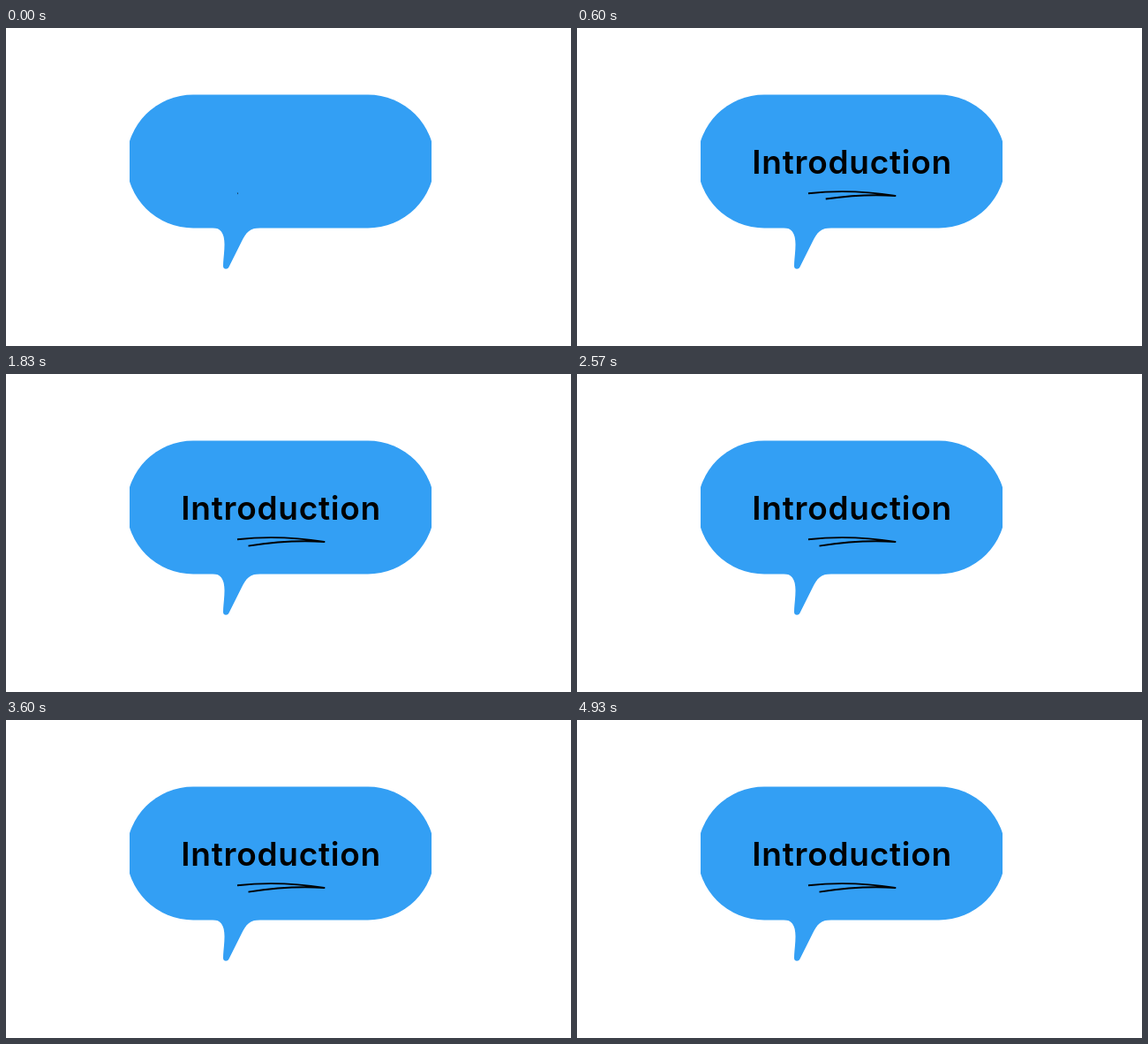
An HTML page for the animation above (5 s loop, 640x360 px).

```html
<!DOCTYPE html>
<html lang="en">
<head>
<meta charset="utf-8">
<title>Introduction</title>
<style>
  html, body { margin: 0; width: 100%; height: 100%; overflow: hidden; background: #fff; }
  svg { display: block; width: 100vw; height: 100vh; }
  text { font: 600 37px Inter, "Open Sans", sans-serif; letter-spacing: .75px; text-anchor: middle; }
</style>
</head>
<body>
<svg viewBox="0 0 640 360">
  <clipPath id="sides"><rect x="140" y="70" width="342" height="210"/></clipPath>
  <clipPath id="shown"><rect id="reveal" x="173" y="120" width="0" height="64"/></clipPath>
  <g fill="#339ff4" clip-path="url(#sides)">
    <rect x="136.5" y="75.5" width="349" height="151" rx="75.5"/>
    <path d="M234 226C243 226.500 247.500 232 247.500 245C247.500 254 246 262 246 269.500C246 273.500 251 273.800 252.500 270.500L267 241.500C272 231.500 276 226.500 288 226Z"/>
  </g>
  <text x="311.6" y="165" clip-path="url(#shown)">Introduction</text>
  <rect id="block" y="129" width="0" height="45"/>
  <path id="scribble" d="M262 187.200C295 183.600 325 184.300 360.500 190C332 188 303 190.200 274.500 194.600"
        pathLength="1" fill="none" stroke="#000" stroke-width="1.9" stroke-linejoin="round"/>
</svg>
<script>
  const LOOP = 5000, LEFT = 173, WIDTH = 276;
  const GROW_END = 310, REVEAL_END = 600;
  const SCRIBBLE_LOOP = 2690, SCRIBBLE_DRAW = 750;

  const [reveal, block, scribble] =
    ["reveal", "block", "scribble"].map(id => document.getElementById(id));
  const progress = (t, from, to) => Math.min(1, Math.max(0, (t - from) / (to - from)));
  const easeIn = p => p * p;
  const easeOut = p => 1 - (1 - p) ** 2;

  function draw(t) {
    // The block grows from the left, then shrinks to the right and uncovers the text.
    const head = WIDTH * easeIn(progress(t, 0, GROW_END));
    const tail = WIDTH * easeOut(progress(t, GROW_END, REVEAL_END));
    block.setAttribute("x", LEFT + tail);
    block.setAttribute("width", head - tail);
    reveal.setAttribute("width", tail);

    const drawn = easeOut(progress(t % SCRIBBLE_LOOP, 0, SCRIBBLE_DRAW));
    scribble.setAttribute("stroke-dasharray", `${drawn} 2`);
  }

  const start = performance.now();
  function tick() {
    draw((performance.now() - start) % LOOP);
    requestAnimationFrame(tick);
  }
  tick();
</script>
</body>
</html>
```
